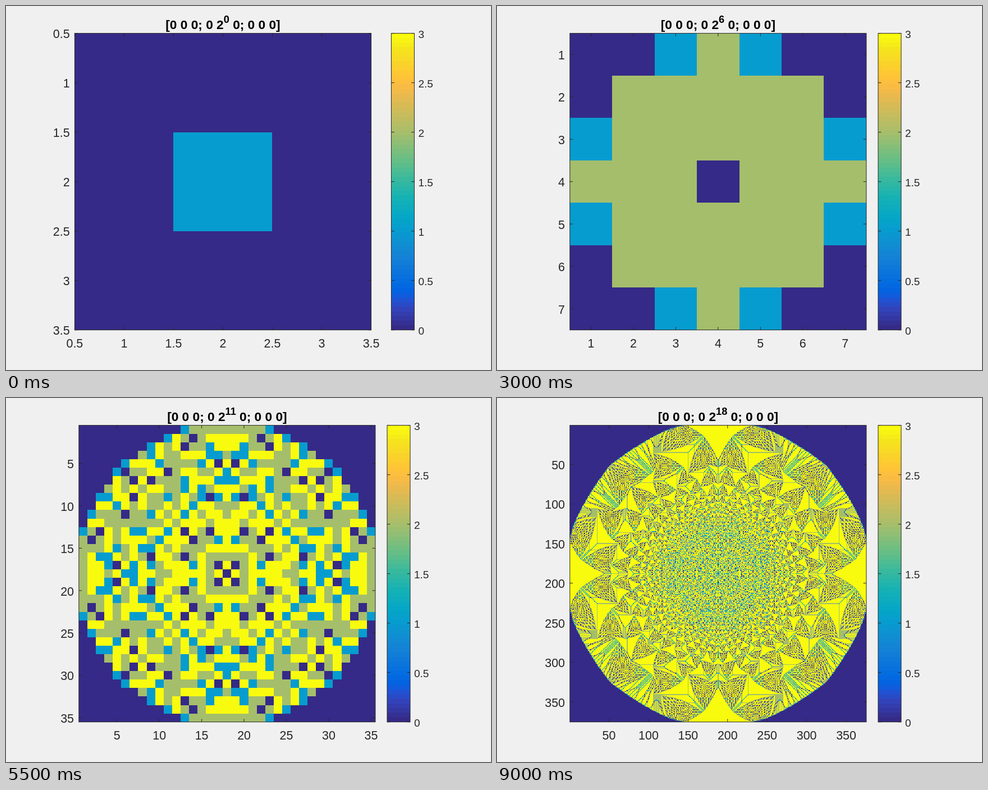
These frames come from a looping animation (864 px wide and 648 px high, 9500 ms). An HTML page with a canvas:

```html
<!DOCTYPE html>
<html lang="en">
<head>
<meta charset="utf-8">
<title>Sandpile</title>
<style>
  html, body { margin: 0; width: 100%; height: 100%; overflow: hidden; background: #f0f0f0; }
  canvas { display: block; }
</style>
</head>
<body>
<canvas id="stage" width="864" height="648"></canvas>
<script>
const start = performance.now();
const ctx = document.getElementById('stage').getContext('2d');
const LEVELS = 19, STEP = 500;
const TOP = 648 * 0.075, SIDE = 648 * 0.815;
const FONT = '"Liberation Sans", Arial, sans-serif';
const INK = '#262626';

// Colour map: 64 entries interpolated between knots.
const knots = { 0: '352a87', 4: '3243ba', 6: '2053d4', 7: '0f5cdd', 8: '0363e1', 10: '046de0',
  14: '127dd8', 16: '1485d4', 18: '108ed2', 21: '079ccf', 24: '06a7c6', 28: '15b1b4',
  32: '38b99e', 36: '65be86', 42: 'a5be6b', 50: 'e9b94e', 52: 'f8bb44', 54: 'ffc337',
  57: 'fad32a', 60: 'f5e41d', 63: 'f9fb0e' };
const stops = Object.keys(knots).map(Number);
const rgb = k => [0, 2, 4].map(i => parseInt(knots[k].slice(i, i + 2), 16));

function mapColor(i) {
  const hi = stops.find(k => k >= i);
  const lo = stops.findLast(k => k <= i);
  const f = hi > lo ? (i - lo) / (hi - lo) : 0;
  const a = rgb(lo), b = rgb(hi);
  return a.map((v, c) => Math.round(v + (b[c] - v) * f));
}

const cellColors = [0, 21, 42, 63].map(i => {
  const [r, g, b] = mapColor(i);
  return (255 << 24 | b << 16 | g << 8 | r) >>> 0;
});

// Sandpile stored as one octant, 0 <= y <= x, at index x * W + y.
const W = 210;
const pile = new Int32Array(W * W);
const levels = [];
let reach = 0;
pile[0] = 1;

function sweep() {
  let moved = false;
  for (let x = 0; x <= reach; x++) {
    for (let y = 0, i = x * W; y <= x; y++, i++) {
      const v = pile[i];
      if (v < 4) continue;
      const q = v >> 2;
      moved = true;
      pile[i] = v & 3;
      pile[i + W] += q;
      if (x > y) {
        pile[i - W] += x === 1 ? 4 * q : x === y + 1 ? 2 * q : q;
        pile[i + 1] += x === y + 1 ? 2 * q : q;
      }
      if (y) pile[i - 1] += y === 1 ? 2 * q : q;
      if (x === reach) reach++;
    }
  }
  return moved;
}

// Doubling a stable pile and settling it again gives the next power of two.
function advance() {
  if (sweep()) return;
  levels.push({ half: Math.max(1, reach), cells: Uint8Array.from(pile) });
  for (let i = 0; i < pile.length; i++) pile[i] *= 2;
}

function ticks(size, most) {
  const first = s => Math.ceil(0.5 / s);
  const last = s => Math.floor((size + 0.5) / s);
  const step = [0.5, 1, 2, 5, 10, 20, 50].find(s => last(s) - first(s) < most);
  const list = [];
  for (let k = first(step); k <= last(step); k++) list.push(k * step);
  return list;
}

function text(str, x, y, font, align, color = INK) {
  ctx.font = font + ' ' + FONT;
  ctx.textAlign = align;
  ctx.fillStyle = color;
  ctx.fillText(str, x, y);
  return ctx.measureText(str).width;
}

function line(x, y, dx, dy) {
  ctx.beginPath();
  ctx.moveTo(x, y);
  ctx.lineTo(x + dx, y + dy);
  ctx.stroke();
}

function frame(x, w) {
  ctx.strokeStyle = INK;
  ctx.lineWidth = 1;
  ctx.strokeRect(x, TOP, w, SIDE);
}

function drawGrid(left, { half, cells }) {
  const size = 2 * half + 1;
  const count = Math.floor(SIDE);
  const x0 = Math.round(left), y0 = Math.round(TOP);
  const image = ctx.createImageData(count, count);
  const px = new Uint32Array(image.data.buffer);
  // Cell distance from the centre under each pixel centre.
  const distances = shift => Array.from({ length: count }, (_, i) =>
    Math.abs(Math.max(0, Math.floor((i + 0.5 + shift) / SIDE * size)) - half));
  const dx = distances(x0 - left), dy = distances(y0 - TOP);
  let p = 0;
  for (const b of dy) {
    for (const a of dx) px[p++] = cellColors[cells[a > b ? a * W + b : b * W + a]];
  }
  ctx.putImageData(image, x0, y0);
  frame(left, SIDE);

  const place = v => (v - 0.5) / size * SIDE;
  for (const v of ticks(size, 8)) {
    const x = left + place(v);
    line(x, TOP, 0, 5.3);
    line(x, TOP + SIDE, 0, -5.3);
    text(v, x, 608, '21.4px', 'center');
  }
  for (const v of ticks(size, 11)) {
    const y = TOP + place(v);
    line(left, y, 5.3, 0);
    line(left + SIDE, y, -5.3, 0);
    text(v, left - 8.8, Math.round(y + 8.7), '21.4px', 'right');
  }
}

function drawBar(left) {
  const width = 41;
  const edge = i => Math.round(TOP + SIDE * (1 - i / 64));
  for (let i = 0; i < 64; i++) {
    ctx.fillStyle = `rgb(${mapColor(i)})`;
    ctx.fillRect(Math.round(left), edge(i + 1), width, edge(i) - edge(i + 1));
  }
  frame(left, width);
  for (let v = 0; v <= 3; v += 0.5) {
    const y = TOP + SIDE * (1 - v / 3);
    line(left, y, 5.3, 0);
    line(left + width, y, -5.3, 0);
    text(v, left + 48, Math.round(y + 8), '19px', 'left');
  }
}

function drawTitle(center, n) {
  const big = 'bold 22.7px', small = 'bold 18.2px';
  const parts = [['[0 0 0; 0 2', big, 41], [n, small, 30], [' 0; 0 0 0]', big, 41]];
  const width = parts.reduce((sum, [str, font]) => {
    ctx.font = font + ' ' + FONT;
    return sum + ctx.measureText(str).width;
  }, 0);
  let x = center - width / 2;
  for (const [str, font, y] of parts) x += text(str, x, y, font, 'left', '#000');
}

function draw(n) {
  const level = levels[n];
  // Half-step tick labels need more room, which pushes the axes and bar apart.
  const spread = level.half === 1 ? 7.4 : 0;
  const left = 129.8 - spread;
  ctx.fillStyle = '#f0f0f0';
  ctx.fillRect(0, 0, 864, 648);
  drawGrid(left, level);
  drawBar(679 + spread);
  drawTitle(left + SIDE / 2, n);
}

let shown = -1;
function tick() {
  const now = performance.now();
  const n = Math.floor((now - start) / STEP) % LEVELS;
  while (levels.length <= n) advance();
  if (n !== shown) draw(shown = n);
  // Prepare later piles in short slices.
  while (levels.length < LEVELS && performance.now() < now + 8) advance();
  requestAnimationFrame(tick);
}
tick();
</script>
</body>
</html>
```
